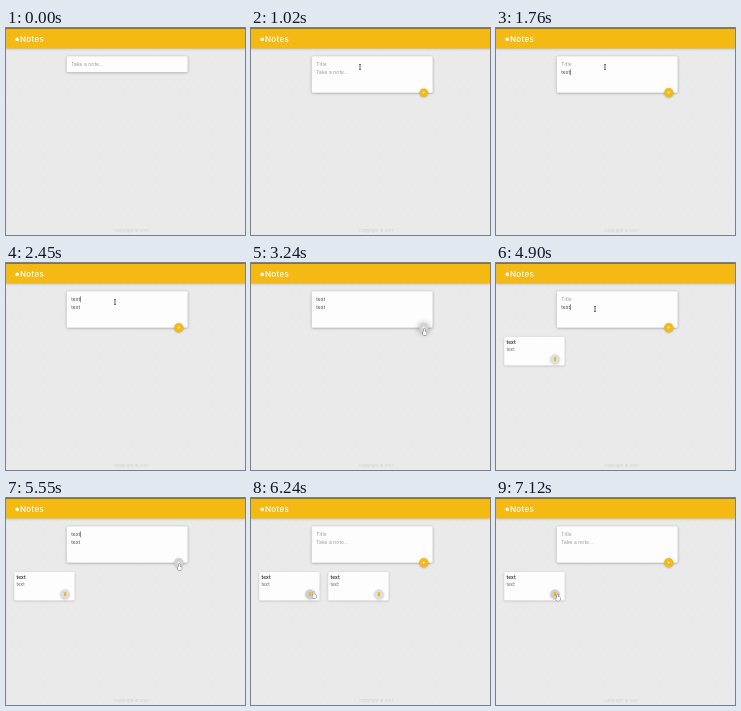
An HTML page with a canvas that plays this animation: 239 px wide and 207 px high, repeating every 7.16 s.

```html
<!DOCTYPE html>
<html lang="en">
<head>
<meta charset="utf-8">
<title>Notes</title>
<style>
html, body { margin: 0; width: 100%; height: 100%; overflow: hidden; background: #eaeaea; }
canvas { display: block; width: 239px; height: 207px; }
</style>
</head>
<body>
<canvas id="stage"></canvas>
<script>
const W = 239, H = 207, LOOP = 7160;
const YELLOW = '#f4b913';
const FONT = 'Inter, "Open Sans", sans-serif';
const FORM = { x: 60.7, y: 28.2, w: 121, closed: 16, open: 36.5 };
const ADD = { x: 172.8, y: 64.7 }, BIN = { x: 59, y: 96.2 }, BUTTON_R = 4.7;
const NOTE_X = 8, NOTE_STEP = 69;
const OPEN_AT = 840, PRESS_AT = 3240, DELETE_AT = 6610;
const KEY_TIME = 75;

// When each field of a note is typed and when the note is saved
const rounds = [
  { body: 1530, title: 2170, save: 3380 },
  { body: 4490, title: 5060, save: 5690 }
];

// Pointer stops: each move runs from the previous stop
const stops = [
  { start: 0, end: 0, x: 150, y: 212 },
  { start: 50, end: 600, x: 109, y: 39 },
  { start: 2730, end: 3100, x: 173.3, y: 67 },
  { start: 3430, end: 4070, x: 79.5, y: 83.5, dip: 28 },
  { start: 4120, end: 4350, x: 99, y: 46 },
  { start: 5290, end: 5520, x: 173.3, y: 67 },
  { start: 5780, end: 6220, x: 63, y: 95 },
  { start: 6400, end: 6560, x: 61.8, y: 97.5 }
];

const canvas = document.getElementById('stage');
const ctx = canvas.getContext('2d');
const ratio = window.devicePixelRatio || 1;
canvas.width = W * ratio;
canvas.height = H * ratio;

const clamp = v => Math.max(0, Math.min(1, v));
const ease = v => v * v * (3 - 2 * v);
const over = (p, q) => Math.hypot(p.x - q.x, p.y - q.y) < BUTTON_R + 0.8;

function pointerAt(t) {
  const i = Math.max(1, stops.findLastIndex(s => s.start <= t));
  const from = stops[i - 1], to = stops[i];
  const k = ease(clamp((t - to.start) / (to.end - to.start)));
  return {
    x: from.x + (to.x - from.x) * k,
    y: from.y + (to.y - from.y) * k + (to.dip || 0) * Math.sin(Math.PI * k)
  };
}

function text(str, x, y, size, color, weight = 400, spacing = 0.1) {
  ctx.font = `${weight} ${size}px ${FONT}`;
  ctx.letterSpacing = `${spacing}px`;
  ctx.fillStyle = color;
  ctx.fillText(str, x, y);
  return ctx.measureText(str).width;
}

function raised(color, alpha, blur, shape) {
  ctx.save();
  ctx.shadowColor = `rgba(0,0,0,${alpha})`;
  ctx.shadowBlur = blur * ratio;
  ctx.shadowOffsetY = 0.6 * ratio;
  ctx.fillStyle = color;
  ctx.beginPath();
  shape();
  ctx.fill();
  ctx.restore();
}

function card(x, y, w, h, alpha) {
  raised('#fdfdfd', alpha, 2.5, () => ctx.roundRect(x, y, w, h, 1.5));
}

function disc(x, y, r, color, alpha = 0.25, blur = 2) {
  raised(color, alpha, blur, () => ctx.arc(x, y, r, 0, 7));
}

function texture() {
  ctx.strokeStyle = 'rgba(0,0,0,.018)';
  ctx.lineWidth = 0.6;
  ctx.beginPath();
  for (let x = -H; x < W + H; x += 7) {
    for (const slope of [0.6, -0.6]) {
      ctx.moveTo(x, 0);
      ctx.lineTo(x + H * slope, H);
    }
  }
  ctx.stroke();
}

function header() {
  raised(YELLOW, 0.22, 2.5, () => ctx.rect(0, 0, W, 20.4));
  ctx.fillStyle = '#6d6240';
  ctx.fillRect(0, 0, W, 0.8);
  disc(11.2, 11.4, 1.8, '#fff', 0);
  text('Notes', 14, 13.8, 8, '#fff', 500, 0.3);
}

function field(name, hint, y, t) {
  const round = rounds.find(r => t < r.save);
  const keys = round ? Math.floor((t - round[name]) / KEY_TIME) + 1 : 0;
  const value = 'text'.slice(0, Math.max(0, keys));
  const width = text(value || hint, 65.2, y, 4.9, value ? '#484848' : '#999');

  if (!round) return;
  const focus = t < round.title - 150 ? 'body' : 'title';
  const idle = t - round[name];
  if (focus === name && idle > -200 && idle < 700) {
    ctx.fillStyle = '#444';
    ctx.fillRect(65.2 + (value ? width : 0), y - 4.6, 0.6, 5.8);
  }
}

function addButton(t, p) {
  const size = ease(clamp((t - OPEN_AT) / 225));
  const pressed = t >= PRESS_AT && t < rounds[0].save;
  ctx.save();
  ctx.translate(ADD.x, ADD.y);
  ctx.scale(size, size);
  disc(0, 0, BUTTON_R, over(p, ADD) ? '#d2d2d2' : YELLOW, pressed ? 0.4 : 0.25, pressed ? 6 : 2);
  ctx.fillStyle = '#fff';
  ctx.fillRect(-1.3, -0.3, 2.6, 0.6);
  ctx.fillRect(-0.3, -1.3, 0.6, 2.6);
  ctx.restore();
}

function form(t, p) {
  const open = t >= OPEN_AT;
  card(FORM.x, FORM.y, FORM.w, open ? FORM.open : FORM.closed, 0.36);
  if (open) field('title', 'Title', 38, t);
  field('body', 'Take a note...', open ? 46 : 38, t);
  if (open) addButton(t, p);
}

function note(index, p) {
  const x = NOTE_X + NOTE_STEP * index;
  const bin = { x: BIN.x + NOTE_STEP * index, y: BIN.y };
  card(x + 0.2, 74.1, 60.4, 28.3, 0.22);
  text('text', x + 2.4, 81, 4.8, '#2c2c2c', 600);
  text('text', x + 2.4, 87.7, 4.5, '#606060');
  disc(bin.x, bin.y, BUTTON_R, over(p, bin) ? '#cfcfcf' : '#dedede');
  ctx.fillStyle = '#eab52a';
  ctx.fillRect(bin.x - 1.4, bin.y - 2, 2.8, 0.7);
  ctx.fillRect(bin.x - 1.1, bin.y - 1.1, 2.2, 3);
}

function hand() {
  ctx.roundRect(-0.7, -1.2, 1.3, 4.5, 0.6);
  ctx.roundRect(-1.6, 1.6, 4, 3.6, 1.2);
  ctx.stroke();
  ctx.fill();
}

function beam() {
  ctx.moveTo(0, -2.4);
  ctx.lineTo(0, 2.4);
  for (const end of [-2.4, 2.4]) {
    ctx.moveTo(-1, end);
    ctx.lineTo(1, end);
  }
  ctx.stroke();
}

function arrow() {
  ctx.moveTo(3.4, 3.5);
  ctx.lineTo(0, 0);
  ctx.lineTo(0, 4.8);
  ctx.lineTo(1.3, 3.8);
  ctx.lineTo(2.2, 5.4);
  ctx.lineTo(2, 3.6);
  ctx.closePath();
  ctx.stroke();
  ctx.fill();
}

function pointer(p) {
  const onButton = over(p, ADD) || over(p, BIN);
  const onForm = p.x > FORM.x && p.x < FORM.x + FORM.w && p.y > FORM.y && p.y < FORM.y + FORM.open;
  const isArrow = !onButton && !onForm;
  ctx.save();
  ctx.translate(p.x, p.y);
  ctx.lineJoin = 'round';
  ctx.lineWidth = 0.8;
  ctx.fillStyle = isArrow ? '#444' : '#fff';
  ctx.strokeStyle = isArrow ? '#e8e8e8' : '#444';
  ctx.beginPath();
  if (onButton) hand();
  else if (onForm) beam();
  else arrow();
  ctx.restore();
}

function draw(t) {
  const p = pointerAt(t);
  ctx.setTransform(ratio, 0, 0, ratio, 0, 0);
  ctx.fillStyle = '#eaeaea';
  ctx.fillRect(0, 0, W, H);
  texture();
  header();
  form(t, p);
  const saved = rounds.filter(r => t >= r.save).length;
  const count = saved - (t >= DELETE_AT ? 1 : 0);
  for (let i = 0; i < count; i++) note(i, p);
  text('Copyright © 2017', 108, 203.5, 4, '#cdcdcd');
  pointer(p);
}

const start = performance.now();
function frame() {
  draw((performance.now() - start) % LOOP);
  requestAnimationFrame(frame);
}
frame();
</script>
</body>
</html>
```
